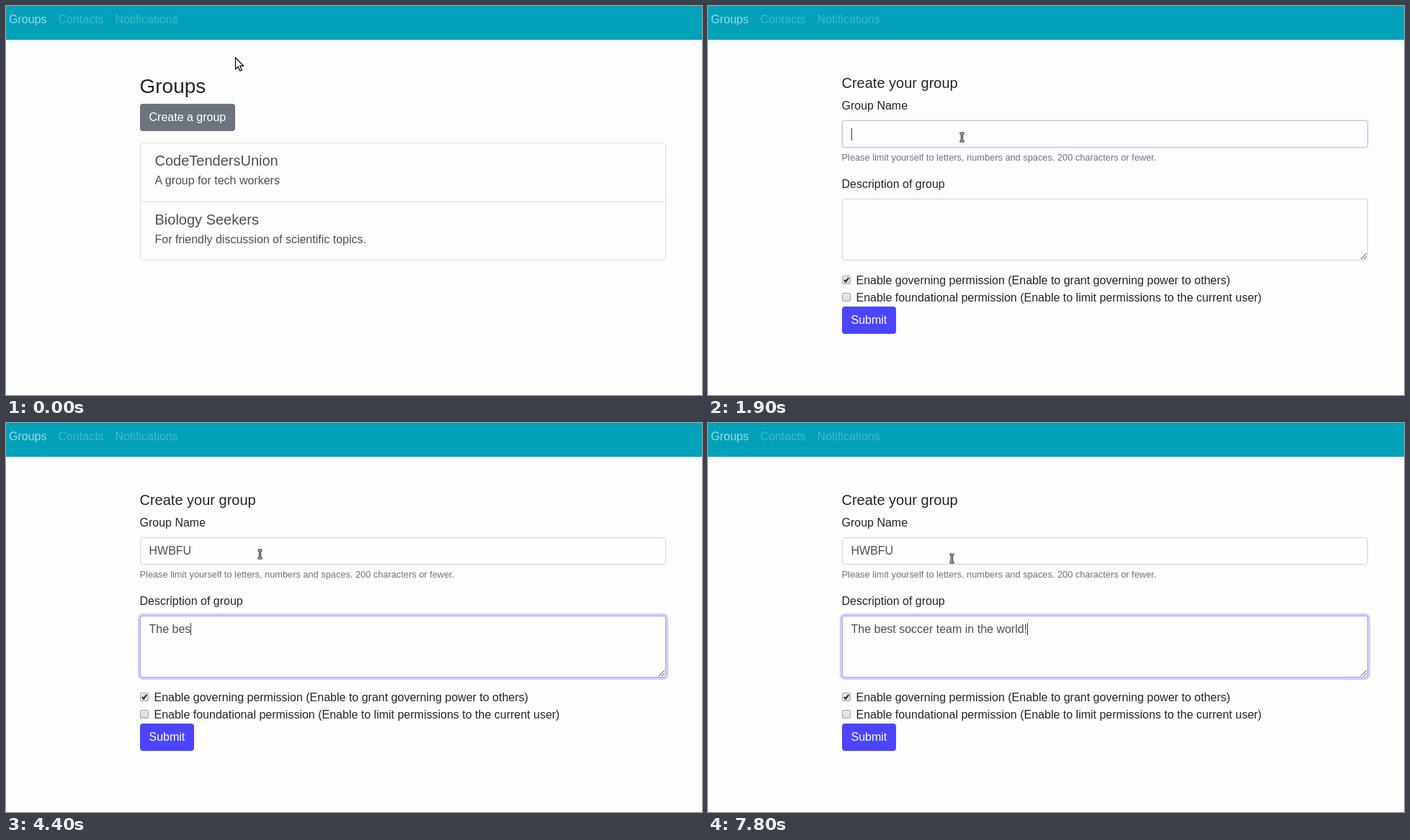
An HTML page for the animation above (8 s loop, 966 by 541 pixels).

```html
<!DOCTYPE html>
<html lang="en">
<head>
<meta charset="utf-8">
<title>Create a group</title>
<style>
  * { box-sizing: border-box; }
  html, body { margin: 0; width: 100%; height: 100%; overflow: hidden; }
  body {
    position: relative;
    background: #fefdfe;
    color: #212529;
    font: 16px/24px "Liberation Sans", Arial, sans-serif;
  }
  nav {
    display: flex;
    gap: 16px;
    height: 47px;
    padding: 7px 4px;
    background: #00a1b9;
    color: #40b9cb;
  }
  nav b { font-weight: normal; color: #97d9e3; }

  main { position: absolute; left: 185.5px; top: 94.8px; width: 730px; }
  [hidden] { display: none; }
  h1, h2, h3, p { margin: 0; font-weight: normal; }
  h1 { font-size: 28px; line-height: 33.6px; margin-bottom: 8px; }
  h2, h3 { font-size: 20px; line-height: 24px; }
  h2 { margin-bottom: 8px; }
  h3 { margin-bottom: 4px; }

  .button {
    width: fit-content;
    padding: 7px 13px;
    border-radius: 4px;
    color: #fff;
    background: #4c45ff;
  }
  #create { background: color-mix(in srgb, #5a6268 calc(var(--hover) * 100%), #6c757d); }

  .list { margin-top: 16px; border: 1px solid #dfdfe0; border-radius: 4px; color: #495057; }
  .list div { height: 81px; padding: 12px 20px; }
  .list div + div { border-top: 1px solid #dfdfe0; }

  .label { margin-bottom: 8px; }
  .field {
    --glow: 0;
    position: relative;
    height: 38px;
    padding: 6px 12px;
    border: 1px solid color-mix(in srgb, #a3a8f2 calc(var(--glow) * 100%), #ced4da);
    border-radius: 4px;
    background: #fefdfe;
    color: #495057;
    box-shadow: 0 0 0 calc(var(--glow) * 3.2px) rgb(75 69 255 / calc(var(--glow) * .26));
  }
  .area { height: 86px; margin-bottom: 16px; }
  .typed {
    position: relative;
    display: inline-block;
    height: 24px;
    vertical-align: top;
    white-space: pre;
  }
  .focused .typed::after {
    content: "";
    position: absolute;
    left: 100%;
    top: 4px;
    width: 1px;
    height: 17px;
    background: #343a40;
  }
  .area .typed::after { top: 3px; }
  .area svg { position: absolute; right: 1px; bottom: 1px; }
  .help { margin: 4px 0 16px; font-size: 12.8px; line-height: 19.2px; color: #6c757d; }
  .check { position: relative; padding-left: 20px; }
  .check svg { position: absolute; left: .5px; top: 5px; }

  #pointer { position: absolute; left: 0; top: 0; overflow: visible; }
</style>
</head>
<body>
<nav><b>Groups</b><span>Contacts</span><span>Notifications</span></nav>

<main id="groups">
  <h1>Groups</h1>
  <div class="button" id="create">Create a group</div>
  <div class="list">
    <div><h3>CodeTendersUnion</h3><p>A group for tech workers</p></div>
    <div><h3>Biology Seekers</h3><p>For friendly discussion of scientific topics.</p></div>
  </div>
</main>

<main id="form" hidden>
  <h2>Create your group</h2>
  <div class="label">Group Name</div>
  <div class="field" id="name"><span class="typed"></span></div>
  <div class="help">Please limit yourself to letters, numbers and spaces. 200 characters or fewer.</div>
  <div class="label">Description of group</div>
  <div class="field area" id="description">
    <span class="typed"></span>
    <svg width="8" height="8" stroke="#4a4a4a" stroke-width="1"><path d="M0 8L8 0M4 8L8 4"/></svg>
  </div>
  <div class="check">
    <svg width="12" height="12"><use href="#box"/><path d="M3 6L5 8.5L9.3 3" fill="none" stroke="#303030" stroke-width="2.2"/></svg>
    Enable governing permission (Enable to grant governing power to others)
  </div>
  <div class="check">
    <svg width="12" height="12"><use href="#box"/></svg>
    Enable foundational permission (Enable to limit permissions to the current user)
  </div>
  <div class="button">Submit</div>
</main>

<svg id="pointer" width="1" height="1">
  <defs>
    <linearGradient id="shade" x2="0" y2="1">
      <stop stop-color="#eee"/><stop offset="1" stop-color="#d8d8d8"/>
    </linearGradient>
    <rect id="box" x=".5" y=".5" width="11" height="11" rx="1.5" fill="url(#shade)" stroke="#a3a3a3"/>
    <path id="beam" d="M-3 -5.5H3M0 -5.5V5.5M-3 5.5H3" fill="none"/>
  </defs>
  <g data-shape="arrow">
    <path d="M.5 .8V16.8L4.2 13.4L6.8 19.3L9.4 18.2L6.8 12.4H11.6Z" fill="#fff" stroke="#000" stroke-width="1.2"/>
  </g>
  <g data-shape="hand">
    <path d="M-1.5 9V1.5Q0 -1 1.5 1.5V7L9 8.5Q11 9 10.5 12L9 19H0L-5.5 11.5Q-5 9 -3 10L-1.5 12Z"
      fill="#fff" stroke="#000" stroke-width="1.2" stroke-linejoin="round"/>
  </g>
  <g data-shape="text">
    <use href="#beam" stroke="#000" stroke-width="3"/>
    <use href="#beam" stroke="#fff" stroke-width="1"/>
  </g>
</svg>

<script>
  const LOOP = 8000, TICK = 100;
  const byId = id => document.getElementById(id);
  const pointer = byId('pointer');
  const shapes = [...pointer.querySelectorAll('[data-shape]')];

  // Each run starts at a time and adds one piece per tick.
  const nameRuns = [[2300, 'H|W'], [2600, 'B|F|U']];
  const descriptionRuns = [
    [3800, 'Th|e| '],
    [4200, 'b|e|s|t| |s|o|c|c'],
    [5200, 'er| |t'],
    [5600, 'e|a|m| '],
    [6100, 'i|n| |t|h|e| w|o|r'],
    [7500, 'ld!']
  ];

  // time, x, y, shape
  const moves = [
    [0, 318, 71, 'arrow'],
    [400, 318, 71, 'arrow'],
    [700, 302, 140, 'hand'],
    [800, 297, 154, 'hand'],
    [900, 297, 154, 'hand'],
    [1200, 336, 174, 'arrow'],
    [1300, 336, 174, 'arrow'],
    [1400, 352.5, 182.5, 'text'],
    [7700, 352.5, 182.5, 'text'],
    [7800, 338.5, 188.5, 'text']
  ];

  const ramp = (t, from, to) => Math.min(1, Math.max(0, (t - from) / (to - from)));

  function typedAt(runs, t) {
    return runs.map(([start, pieces]) =>
      pieces.split('|').slice(0, Math.max(0, (t - start) / TICK + 1)).join('')
    ).join('');
  }

  function pointerAt(t) {
    const i = moves.findLastIndex(move => move[0] <= t);
    const [t0, x0, y0, shape] = moves[i];
    const [t1, x1, y1] = moves[i + 1] || [LOOP, x0, y0];
    const k = ramp(t, t0, t1);
    return { x: x0 + (x1 - x0) * k, y: y0 + (y1 - y0) * k, shape };
  }

  function drawField(id, text, glow, focused) {
    const field = byId(id);
    field.style.setProperty('--glow', glow);
    field.classList.toggle('focused', focused);
    field.querySelector('.typed').textContent = text;
  }

  function draw(t) {
    const onForm = t >= 1400;
    byId('groups').hidden = onForm;
    byId('form').hidden = !onForm;
    byId('create').style.setProperty('--hover', ramp(t, 600, 800));

    const nameGlow = t < 3200 ? ramp(t, 1835, 2000) : 1 - ramp(t, 3180, 3380);
    drawField('name', typedAt(nameRuns, t), nameGlow, t >= 1900 && t < 3200);
    drawField('description', typedAt(descriptionRuns, t), ramp(t, 3220, 3400), t >= 3200);

    const { x, y, shape } = pointerAt(t);
    pointer.style.transform = `translate(${x}px, ${y}px)`;
    for (const g of shapes) g.style.display = g.dataset.shape === shape ? '' : 'none';
  }

  const start = performance.now();
  function frame() {
    const t = (performance.now() - start) % LOOP;
    draw(Math.floor(t / TICK) * TICK);
    requestAnimationFrame(frame);
  }
  frame();
</script>
</body>
</html>
```
